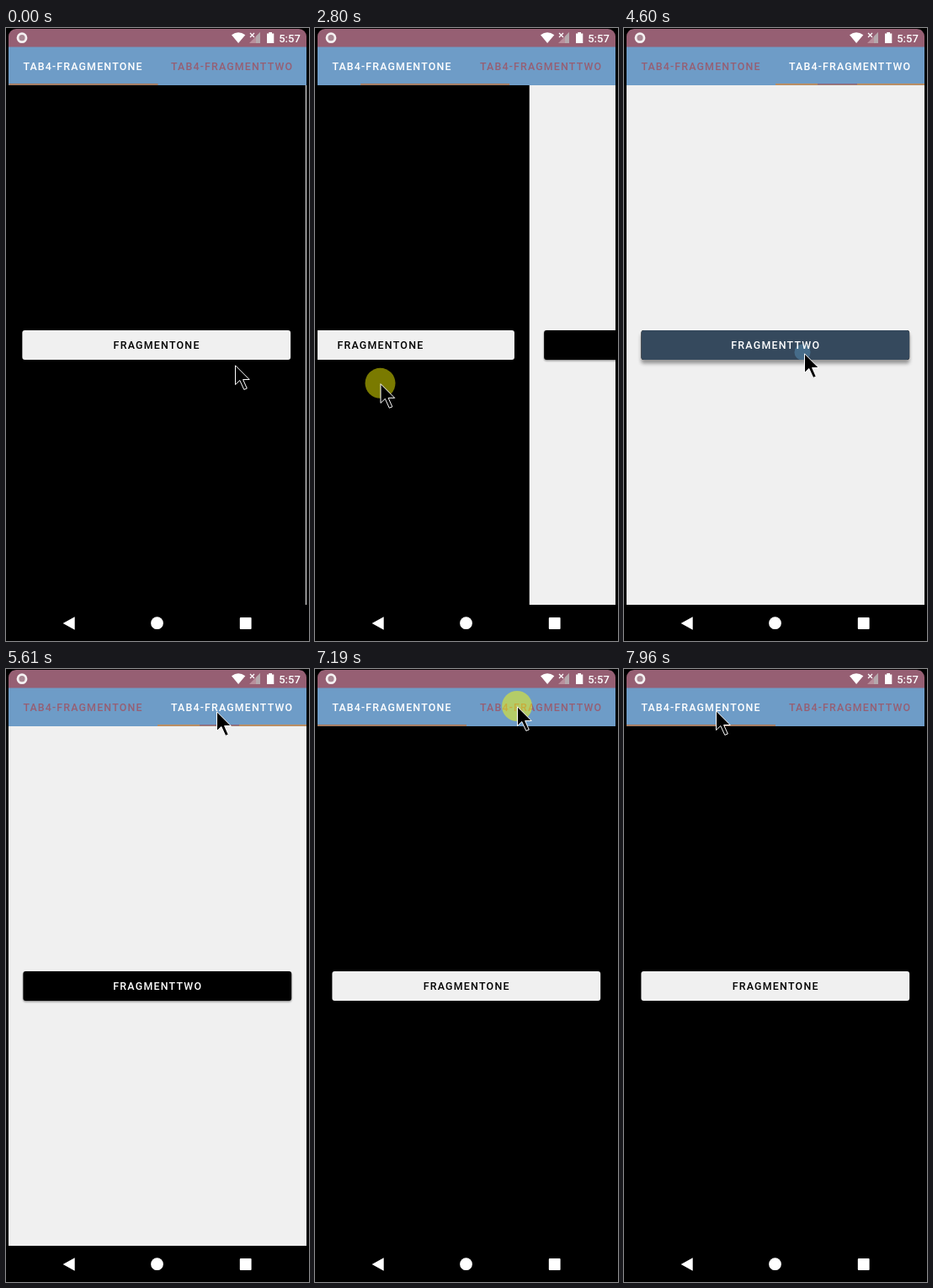
Write an HTML page that moves like this. It is 360 px wide and 728 px high and loops after 8000 ms.

```html
<!DOCTYPE html>
<html lang="en">
<head>
<meta charset="utf-8">
<title>Tabs</title>
<style>
  html, body { margin: 0; width: 100%; height: 100%; overflow: hidden; background: #000; }
  svg { display: block; width: 100%; height: 100%; }
  text { font: 500 12.4px Roboto, sans-serif; letter-spacing: 1.18px; text-anchor: middle; }
  .label { letter-spacing: 1.25px; }
  .clock { font-size: 13px; letter-spacing: 0; }
</style>
</head>
<body>
<svg viewBox="0 0 360 728">
  <defs>
    <rect id="face" x="20.4" y="359" width="318.8" height="35" rx="3"/>
    <clipPath id="view"><rect x="3" y="67" width="354" height="618"/></clipPath>
    <clipPath id="inside"><use href="#face"/></clipPath>
    <filter id="blur" x="-10%" y="-60%" width="120%" height="220%"><feGaussianBlur id="soft"/></filter>
  </defs>
  <rect width="360" height="728"/>

  <g clip-path="url(#view)">
    <g id="page1">
      <use href="#face" fill="#f0f0f0"/>
      <g clip-path="url(#inside)">
        <use id="tint1" href="#face" fill="#a9c4b7"/>
        <circle id="wave1" cx="225" cy="381" fill="#84ad98"/>
      </g>
      <text class="label" x="180.2" y="381.3">FRAGMENTONE</text>
    </g>
    <g id="page2">
      <rect x="3" y="67" width="354" height="618" fill="#f0f0f0"/>
      <use id="shade" href="#face" filter="url(#blur)"/>
      <use href="#face"/>
      <g clip-path="url(#inside)">
        <use id="tint2" href="#face" fill="#35495d"/>
        <circle id="wave2" cx="212" cy="385" fill="#466c89"/>
      </g>
      <text class="label" x="180.3" y="381.3" fill="#fff">FRAGMENTTWO</text>
    </g>
  </g>

  <path d="M3 23V10A9 9 0 0 1 12 1H348A9 9 0 0 1 357 10V23Z" fill="#965f73"/>
  <rect x="3" y="22.5" width="354" height="45.5" fill="#6e9cc7"/>
  <rect id="bar" y="66" width="177" height="1.8"/>
  <rect id="mark" x="230" y="66" width="47" height="1.4" fill="#8c6a83"/>
  <text id="tab1" x="91.5" y="49.5">TAB4-FRAGMENTONE</text>
  <text id="tab2" x="268.7" y="49.5">TAB4-FRAGMENTTWO</text>

  <circle cx="19" cy="11.7" r="5" fill="#a98793" stroke="#f4f0f1" stroke-width="2.8"/>
  <path d="M268 8.3Q276 2.2 284.3 8.3L276.1 18Z" fill="#fff"/>
  <path d="M302 5V18H289Z" fill="#b98f9c"/>
  <path d="M302 5V18H297V10Z" fill="#b5a9ad"/>
  <path d="M290 6L295 11M295 6L290 11" stroke="#fff" stroke-width="1.2"/>
  <path d="M310 6.5H312.3V5H316V6.5H318.3V18H310Z" fill="#fff"/>
  <text class="clock" x="337" y="16.5" fill="#fff">5:57</text>

  <g fill="#fff">
    <path d="M67.6 707L81.7 699.2V714.8Z"/>
    <circle cx="179.5" cy="706.7" r="7.4"/>
    <rect x="277.8" y="700" width="13.8" height="14" rx="1"/>
  </g>

  <g id="cursor">
    <circle id="press" r="18" fill="#ff0" opacity=".48"/>
    <path d="M.5 .8V23.6L5.8 18.5L10.8 29.4L14.3 28L9.6 17.5H17.2Z" stroke="#fff"/>
  </g>
</svg>
<script>
const LOOP = 8000, WIDTH = 354, CLICK = 80, RIPPLE = 520;
const $ = id => document.getElementById(id);
const set = (id, attrs) => {
  for (const key in attrs) $(id).setAttribute(key, attrs[key]);
};
const mix = (a, b, u) => a + (b - a) * u;
// Eased progress of t from a to b.
const ease = (t, a, b) => {
  const u = Math.max(0, Math.min(1, (t - a) / (b - a)));
  return u * u * (3 - 2 * u);
};

// Page turns go back and forth: two swipes, then three tab clicks.
const turns = [[-880, 30], [2460, 3420], [6380, 6720], [7200, 7570], [7820, 7960]];
const clicks = [5760, ...turns.slice(2).map(([start]) => start - CLICK)];
const taps = { 1: [550, 1560], 2: [3590, 4560] };

// Pointer journeys: leave, arrive, x, y.
const home = [272, 400];
const drag = [2480, 2870, 66, 422];
const journeys = [
  [70, 320, 225, 381],
  [2340, 2480, 205, 420],
  drag,
  [3000, 3440, 214, 386],
  [4850, 5070, 176, 411],
  [5230, 5610, 250, 50],
  [6070, 6300, 110, 44],
  [6560, 7030, 240, 44],
  [7330, 7570, 109, 49]
];

const scrollAt = t => turns.reduce(
  (x, [a, b], i) => mix(x, i % 2 ? WIDTH : 0, ease(t, a, b)), WIDTH);

const pointerAt = t => journeys.reduce(([x, y], [a, b, toX, toY]) => {
  const u = ease(t, a, b);
  return [mix(x, toX, u), mix(y, toY, u)];
}, home);

const pressed = t =>
  (t >= drag[0] && t < drag[1]) || clicks.some(c => t >= c && t < c + CLICK);

// Draws a tap ripple and returns how strongly the button is lit.
function ripple(t, n) {
  const start = taps[n].findLast(s => t >= s) ?? -RIPPLE;
  const u = (t - start) / RIPPLE;
  const lit = 1 - ease(u, .4, 1);
  set('tint' + n, { opacity: lit });
  set('wave' + n, { r: 235 * ease(u, 0, .65), opacity: 1 - ease(u, .25, .85) });
  return lit;
}

function draw(t) {
  const x = scrollAt(t);
  set('page1', { transform: `translate(${-x} 0)` });
  set('page2', { transform: `translate(${WIDTH - x} 0)` });

  ripple(t, 1);
  const lift = ripple(t, 2);
  set('shade', { y: mix(1.2, 4.5, lift), opacity: mix(.45, .38, lift) });
  set('soft', { stdDeviation: mix(1, 2.3, lift) });

  const second = x > WIDTH / 2;
  set('tab1', { fill: second ? '#965f73' : '#fff' });
  set('tab2', { fill: second ? '#fff' : '#965f73' });
  set('bar', { x: 3 + x / 2, fill: second ? '#c48d58' : '#ad7a58' });
  set('mark', { opacity: x === WIDTH ? 1 : 0 });

  set('cursor', { transform: `translate(${pointerAt(t)})` });
  set('press', { visibility: pressed(t) ? 'visible' : 'hidden' });
}

const begin = performance.now();
function tick() {
  draw((performance.now() - begin) % LOOP);
  requestAnimationFrame(tick);
}
tick();
</script>
</body>
</html>
```
